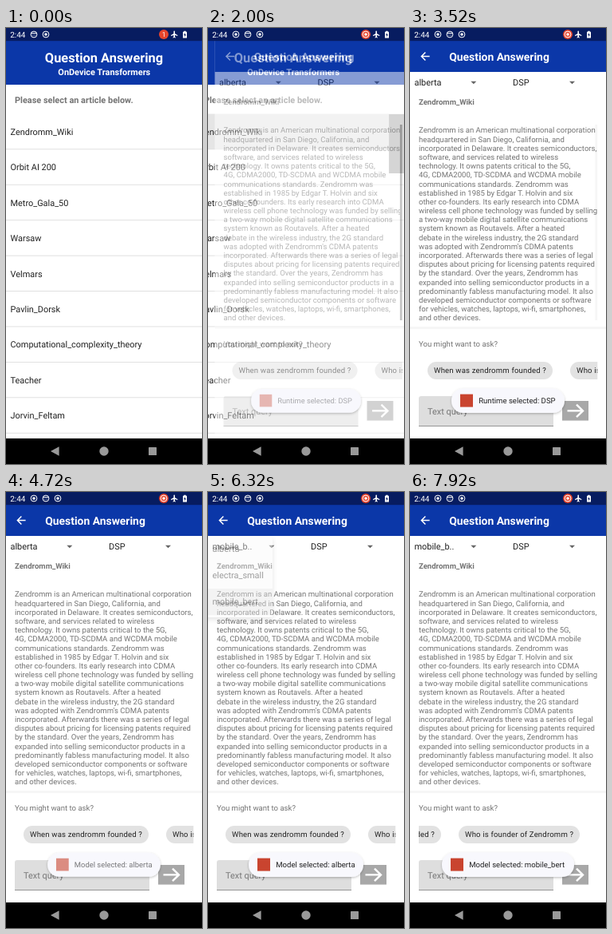
An HTML page for the animation above (8 s loop, 246x546 px).

```html
<!DOCTYPE html>
<html lang="en">
<head>
<meta charset="utf-8">
<title>Question Answering</title>
<style>
html, body { margin: 0; width: 100%; height: 100%; overflow: hidden; background: #fff; }
svg { display: block; width: 246px; height: 546px; }
text { font-family: Roboto, "Noto Sans", sans-serif; white-space: pre; text-rendering: geometricPrecision; }
</style>
</head>
<body>
<svg id="stage" viewBox="0 0 246 546">
  <defs>
    <clipPath id="chipClip"><rect x="11" y="412" width="224.3" height="34"/></clipPath>
    <clipPath id="rowClip"><rect x="-30" y="107.5" width="310" height="44"/></clipPath>
    <radialGradient id="dot">
      <stop offset=".6" stop-color="#888" stop-opacity=".28"/>
      <stop offset="1" stop-color="#888" stop-opacity="0"/>
    </radialGradient>
    <filter id="shadow" x="-20%" y="-40%" width="140%" height="190%">
      <feDropShadow dx="0" dy="1.2" stdDeviation="1.6" flood-color="#000" flood-opacity=".25"/>
    </filter>
    <filter id="deepShadow" x="-20%" y="-20%" width="140%" height="140%">
      <feDropShadow dx="0" dy="2.5" stdDeviation="3" flood-color="#000" flood-opacity=".25"/>
    </filter>
  </defs>
</svg>
<script>
const DURATION = 8000;
const BLUE = '#0b37a8', NAVY = '#071c60', INK = '#212121', GREY = '#737373';
const SP14 = 9.57, SP16 = 10.93, ROW = 44.43;
const stage = document.getElementById('stage');

function add(parent, tag, attrs = {}, content) {
  const node = document.createElementNS('http://www.w3.org/2000/svg', tag);
  for (const key in attrs) node.setAttribute(key, attrs[key]);
  if (content !== undefined) node.textContent = content;
  parent.appendChild(node);
  return node;
}
const group = (parent, attrs) => add(parent, 'g', attrs);
const rect = (parent, x, y, width, height, fill, extra) =>
  add(parent, 'rect', { x, y, width, height, fill, ...extra });
const path = (parent, d, extra) => add(parent, 'path', { d, ...extra });
const label = (parent, content, x, y, size, fill, extra) =>
  add(parent, 'text', { x, y, 'font-size': size, fill, ...extra }, content);
const circle = (parent, cx, cy, r, extra) => add(parent, 'circle', { cx, cy, r, ...extra });

const fade = (node, value) => node.setAttribute('opacity', value);
const move = (node, x, y = 0) => node.setAttribute('transform', `translate(${x} ${y})`);
const ramp = (t, from, to) => Math.min(1, Math.max(0, (t - from) / (to - from)));
const easeOut = p => 1 - (1 - p) ** 3;
const smooth = p => p * p * (3 - 2 * p);

function cubic(x, p) {
  const at = (u, i) => (1 - u) ** 3 * p[0][i] + 3 * (1 - u) ** 2 * u * p[1][i]
    + 3 * (1 - u) * u * u * p[2][i] + u ** 3 * p[3][i];
  let low = 0, high = 1;
  for (let i = 0; i < 24; i++) {
    const mid = (low + high) / 2;
    if (at(mid, 0) < x) low = mid; else high = mid;
  }
  return at(low, 1);
}
// Quick start with a long settling tail.
const emphasized = x => x < 1 / 6
  ? cubic(x, [[0, 0], [.05, 0], [.1333, .06], [.1667, .4]])
  : cubic(x, [[.1667, .4], [.2083, .82], [.25, 1], [1, 1]]);

function buildList() {
  const page = group(stage);
  rect(page, -30, 16, 310, 498, '#fff');
  rect(page, -30, 16, 310, 55, BLUE);
  const centred = { 'text-anchor': 'middle', 'font-weight': 700 };
  label(page, 'Question Answering', 123, 42.8, 16.4, '#fff', centred);
  label(page, 'OnDevice Transformers', 123.3, 59.2, SP16, '#fff', centred);
  label(page, 'Please select an article below.', 11, 93.7, SP16, GREY, { 'font-weight': 700 });
  const row = group(page, { 'clip-path': 'url(#rowClip)' });
  const ripple = circle(row, 136, 130, 0, { fill: '#000', 'fill-opacity': .1 });
  ['Zendromm_Wiki', 'Orbit AI 200', 'Metro_Gala_50', 'Warsaw', 'Velmars', 'Pavlin_Dorsk',
    'Computational_complexity_theory', 'Teacher', 'Jorvin_Feltam'].forEach((name, i) => {
    label(page, name, 5.5, 133.8 + i * ROW, SP16, INK);
    rect(page, -30, 151.4 + i * ROW, 310, .8, '#d9d9d9');
  });
  const bar = rect(page, 243.2, 108, 40, 74, '#aaa');
  return { page, ripple, bar };
}

const ARTICLE = `Zendromm is an American multinational corporation
headquartered in San Diego, California, and
incorporated in Delaware. It creates semiconductors,
software, and services related to wireless
technology. It owns patents critical to the 5G,
4G, CDMA2000, TD-SCDMA and WCDMA mobile
communications standards. Zendromm was
established in 1985 by Edgar T. Holvin and six
other co-founders. Its early research into CDMA
wireless cell phone technology was funded by selling
a two-way mobile digital satellite communications
system known as Routavels. After a heated
debate in the wireless industry, the 2G standard
was adopted with Zendromm's CDMA patents
incorporated. Afterwards there was a series of legal
disputes about pricing for licensing patents required
by the standard. Over the years, Zendromm has
expanded into selling semiconductor products in a
predominantly fabless manufacturing model. It also
developed semiconductor components or software
for vehicles, watches, laptops, wi-fi, smartphones,
and other devices.`;

function buildDetail() {
  const page = group(stage);
  rect(page, 0, 16, 280, 498, '#fff');
  rect(page, 0, 16, 280, 39, BLUE);
  path(page, 'M24.6 35.5H14.6M19.4 30.5L14.4 35.5L19.4 40.5',
    { fill: 'none', stroke: '#fff', 'stroke-width': 1.5 });
  label(page, 'Question Answering', 49.2, 40.8, 13.9, '#fff', { 'font-weight': 700 });

  const model = label(page, 'alberta', 5.5, 72.3, SP16, INK);
  label(page, 'DSP', 129, 72.3, SP16, INK);
  for (const x of [79.8, 203.5]) path(page, `M${x - 3.5} 66.8h7l-3.5 3.5z`, { fill: '#666' });

  label(page, 'Zendromm_Wiki', 11, 96.4, SP14, GREY, { 'font-weight': 700 });
  ARTICLE.split('\n').forEach((line, i) =>
    label(page, line, 11, 131.4 + i * 11.19, SP14, GREY));
  const bar = rect(page, 232.4, 121, 2.8, 245, '#8c8c8c');

  rect(page, 0, 374, 280, 3, '#f6f6f6');
  label(page, 'You might want to ask?', 11, 399.4, SP14, GREY);
  const chips = group(group(page, { 'clip-path': 'url(#chipClip)' }));
  [['When was zendromm founded ?', 22, 157], ['Who is founder of Zendromm ?', 201, 152]]
    .forEach(([question, x, width]) => {
      rect(chips, x, 418, width, 22, '#e2e2e2', { rx: 11 });
      label(chips, question, x + 8, 432.4, SP14, INK, { 'letter-spacing': .17 });
    });

  path(page, 'M11 499V464q0-3 3-3H177q3 0 3 3V499z', { fill: '#dedede' });
  rect(page, 11, 498.2, 169, .8, '#858585');
  label(page, 'Text query', 22, 483.8, SP16, '#777');
  rect(page, 191, 467, 33, 24.6, '#a8a8a8');
  path(page, 'M197.5 479.4H216.5M209 471.6L217 479.4L209 487.2',
    { fill: 'none', stroke: '#fff', 'stroke-width': 2.4 });
  return { page, model, bar, chips };
}

function buildPopup() {
  const popup = group(stage);
  rect(popup, -4, 56, 85, 101, '#fafafa', { filter: 'url(#deepShadow)' });
  const pressed = rect(popup, 0, 121, 81, 33, '#000');
  ['alberta', 'electra_small', 'mobile_bert'].forEach((name, i) =>
    label(popup, name, 5.5, 75.2 + i * 32.8, SP16, INK));
  return { popup, pressed };
}

function buildToast(message, half, start, end) {
  const node = group(stage);
  rect(node, -half, -15, half * 2, 30.5, '#f8f8fd', { rx: 15, filter: 'url(#shadow)' });
  const content = group(node);
  rect(content, 11 - half, -8, 16, 16, '#c9442f');
  label(content, message, 34.2 - half, 3.2, SP14, INK);
  return t => {
    const out = ramp(t, end, end + 200);
    fade(node, ramp(t, start, start + 100) * (1 - out));
    fade(content, ramp(t, start + 50, start + 220));
    const scale = .9 + .1 * easeOut(ramp(t, start, start + 330)) - .06 * out;
    node.setAttribute('transform', `translate(123 466.6) scale(${scale})`);
  };
}

function ringIcon(parent, x) {
  const icon = group(parent);
  circle(icon, x, 8, 3.9, { fill: 'none', stroke: '#fff', 'stroke-width': 1 });
  circle(icon, x, 8, 1.8, { fill: '#fff' });
  return icon;
}

function buildBars() {
  rect(stage, 0, 0, 246, 16.2, NAVY);
  label(stage, '2:44', 5.2, 11.8, 10, '#fff');
  const fresh = ringIcon(stage, 35);
  const older = group(stage);
  circle(older, 35, 8, 3.9, { fill: 'none', stroke: '#fff', 'stroke-width': 1 });
  path(older, 'M32 6.6h6M33.8 9h.1M36.2 9h.1',
    { stroke: '#fff', 'stroke-width': 1, 'stroke-linecap': 'round' });
  ringIcon(older, 50);

  circle(stage, 198, 8, 6, { fill: '#e8452c' });
  const count = label(stage, '1', 198, 11, 8.4, '#fff', { 'text-anchor': 'middle' });
  const record = ringIcon(stage, 198);
  path(stage, 'M211.2 3.6q.8 0 .8 1v2.4l3.4 2.1v1l-3.4-1v2l1 .8v.7l-1.8-.5-1.8.5v-.7l1-.8v-2l-3.4 1v-1l3.4-2.1v-2.4q0-1 .8-1z',
    { fill: '#fff' });
  path(stage, 'M222 4.8h1.3v-1h2.4v1h1.3v7.6h-5z', { fill: '#fff' });
  path(stage, 'M224.9 6l-1.8 3h1.2v2.2l1.7-3h-1.1z', { fill: NAVY });

  rect(stage, 0, 514, 246, 32, '#000');
  path(stage, 'M56 530L66.6 524.2V535.8z', { fill: '#999' });
  circle(stage, 123, 530, 5.7, { fill: '#999' });
  rect(stage, 179, 525, 10, 10, '#999', { rx: .6 });
  return { fresh, older, count, record };
}

const list = buildList();
const detail = buildDetail();
const menu = buildPopup();
const touch = circle(stage, 0, 0, 15, { fill: 'url(#dot)' });
const toasts = [
  buildToast('Runtime selected: DSP', 71, 1890, 4220),
  buildToast('Model selected: alberta', 72, 4570, 6780),
  buildToast('Model selected: mobile_bert', 83, 7110, 9500)
];
const bars = buildBars();

function placeTouch(t, scroll) {
  const taps = [[1640, 1800, 136, 140], [4960, 5060, 50, 70], [6130, 6230, 50, 139],
    [7180, 7480, 190 + scroll, 429]];
  const tap = taps.find(([from, to]) => t >= from && t < to + 80);
  fade(touch, tap ? ramp(t, tap[0] - 1, tap[0] + 30) * (1 - ramp(t, tap[1], tap[1] + 80)) : 0);
  if (tap) move(touch, tap[2], tap[3]);
}

function render(t) {
  const shift = smooth(ramp(t, 40, 440));
  move(bars.older, 15 * shift);
  fade(bars.fresh, shift);
  fade(bars.count, 1 - shift);
  fade(bars.record, shift);

  const slide = emphasized(ramp(t, 1909, 2359));
  move(list.page, -24.6 * slide);
  fade(list.bar, ramp(t, 1600, 1640));
  list.ripple.setAttribute('r', 250 * smooth(ramp(t, 1720, 1960)));
  move(detail.page, 24.6 * (1 - slide));
  fade(detail.page, ramp(t, 1959, 2042));
  fade(detail.bar, 1 - ramp(t, 3300, 3540));

  const selected = t < 6240 ? 'alberta' : 'mobile_b..';
  if (detail.model.textContent !== selected) detail.model.textContent = selected;
  fade(menu.popup, smooth(ramp(t, 5080, 5300)) * (1 - ramp(t, 6220, 6400)));
  fade(menu.pressed, .08 * ramp(t, 6140, 6220));

  const scroll = -140 * easeOut(ramp(t, 7180, 7900));
  move(detail.chips, scroll);
  placeTouch(t, scroll);
  toasts.forEach(update => update(t));
}

function tick() {
  render(performance.now() % DURATION);
  requestAnimationFrame(tick);
}
tick();
</script>
</body>
</html>
```
